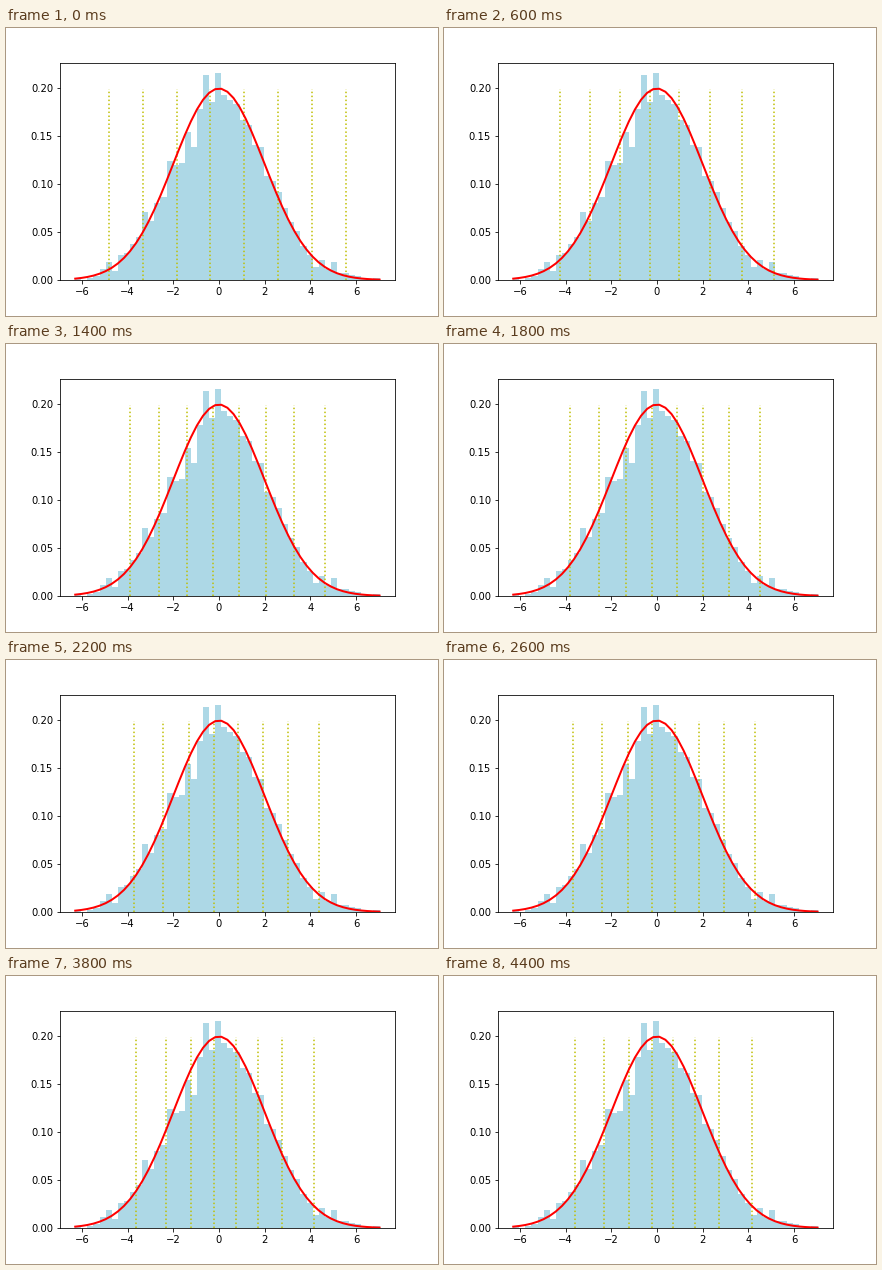
A matplotlib script for the animation above (4600 ms loop, 432 by 288 pixels).

```python
import numpy as np
import matplotlib.pyplot as plt
from matplotlib.animation import FuncAnimation

W, H, DPI = 432, 288, 72
FRAMES, STEP = 23, 200
LO, HI, SIGMA = -6.293, 7.035, 2
CELLS = 9

# How many of the 2000 samples fall in each histogram bin
counts = [1, 0, 1, 2, 6, 10, 5, 14, 15, 20, 24, 38, 33, 43, 46, 66, 64,
          65, 82, 74, 95, 114, 99, 115, 103, 100, 98, 89, 86, 75, 74, 58,
          55, 49, 40, 32, 27, 19, 14, 7, 11, 6, 10, 4, 4, 3, 2, 1, 0, 1]
edges = np.linspace(LO, HI, len(counts) + 1)
width = edges[1] - edges[0]
sample = np.concatenate([a + width * (np.arange(n) + 0.5) / max(n, 1)
                         for a, n in zip(edges, counts)])


def refine(bounds):
    """One Lloyd-Max step: move each bound midway between cell means."""
    cells = np.split(sample, np.searchsorted(sample, bounds))
    means = np.array([cell.mean() for cell in cells])
    return (means[:-1] + means[1:]) / 2


# Decision bounds start evenly spaced and are refined once per frame
history = [np.linspace(LO, HI, CELLS + 1)[1:-1]]
while len(history) < FRAMES:
    history.append(refine(history[-1]))

fig = plt.figure(figsize=(W / DPI, H / DPI), dpi=DPI, facecolor="white")
ax = fig.add_axes([0.125, 0.125, 0.775, 0.755])
ax.hist(sample, bins=edges, density=True, color="lightblue")

pdf = np.exp(-edges**2 / (2 * SIGMA**2)) / (SIGMA * np.sqrt(2 * np.pi))
ax.plot(edges, pdf, "r", lw=2, zorder=4)
lines = [ax.plot([x, x], [0, pdf.max()], "y:", lw=1.5, zorder=3)[0]
         for x in history[0]]
ax.set_xticks(range(-6, 7, 2))
ax.set_yticks(np.arange(0, 0.21, 0.05))


def update(step):
    for line, x in zip(lines, history[step]):
        line.set_xdata([x, x])
    return lines


def init():
    return update(0)


anim = FuncAnimation(fig, update, frames=FRAMES, init_func=init,
                     interval=STEP, repeat=True, repeat_delay=0, blit=False)
plt.show()
```
